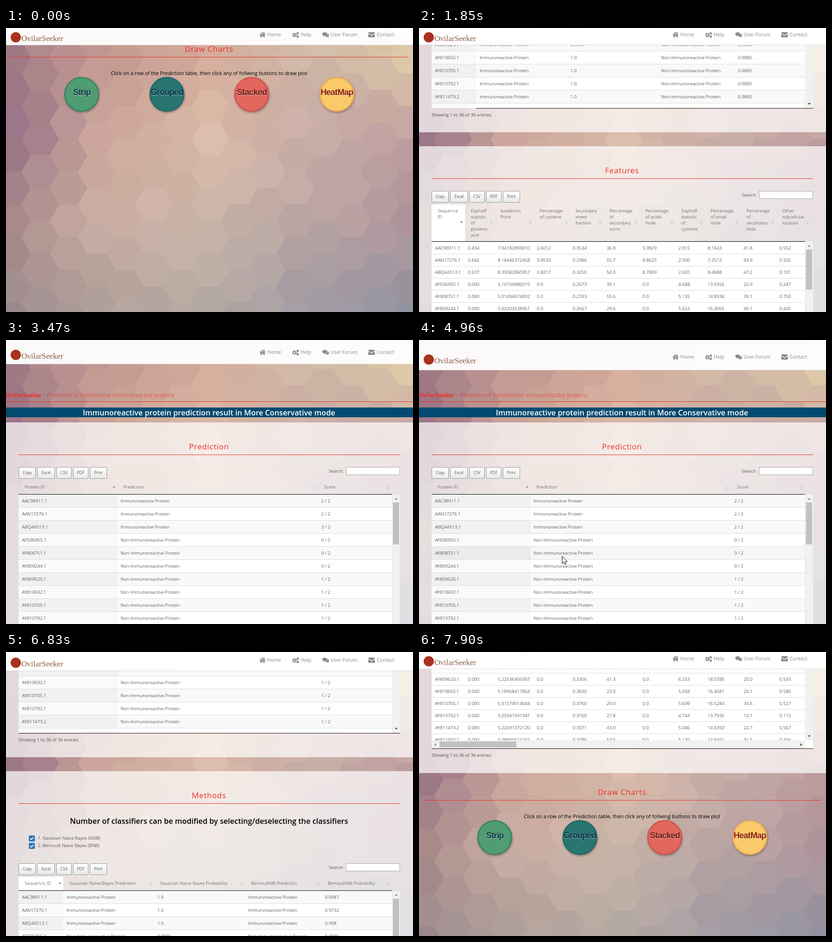
These frames come from a looping animation (874 px wide and 610 px high, 8000 ms). An HTML page:

```html
<!DOCTYPE html>
<html lang="en">
<head>
<meta charset="utf-8">
<title>Prediction result</title>
<style>
html, body { margin: 0; width: 100%; height: 100%; overflow: hidden; }
#stage { position: relative; width: 874px; height: 610px; overflow: hidden; background: #c4aaa2; font: 300 9.8px "Open Sans", sans-serif; color: #111; }
#stage div, #stage svg { position: absolute; box-sizing: border-box; }
#page { left: 0; top: 0; width: 874px; height: 2571px; will-change: transform; }
.t { line-height: 20px; white-space: pre; }
.mid { left: -1px; width: 874px; text-align: center; }
.sec { left: 0; width: 874px; background: rgba(255,255,255,.71); }
.h { font-size: 16.8px; font-weight: 500; letter-spacing: .7px; color: #ee3029; }
.big { font-size: 16.2px; font-weight: 600; color: #000; }
.tools { left: 27px; height: 25px; display: flex; gap: 3px; }
.tools span { border: 1px solid #999; border-radius: 2px; background: linear-gradient(#fff, #e9e9e9); padding: 0 8px; font-size: 8.6px; line-height: 22px; color: #000; }
.body { left: 27px; width: 819px; overflow: hidden; }
.row { left: 0; width: 802px; background: #fff; border-bottom: 1px solid #ddd; }
.plain { border: 0; border-top: 1px solid #ddd; }
.row .k { left: 0; top: 0; height: 100%; }
.odd { background: #f9f9f9; }
.odd .k { background: #f1f1f1; }
.even .k { background: #fafafa; }
.row.hover { background: #f6f6f6; }
.row.hover .k { background: #ebebeb; }
.row.sel { background: #acbad4; }
.row.sel .k { background: #a6b4cd; }
.row.sel.hover { background: #aab7d1; }
.disc { border-radius: 50%; border: 3px solid; box-shadow: 1px 2px 4px rgba(0,0,0,.35); }
.name { font: bold 18px/20px "Liberation Sans", Arial, sans-serif; letter-spacing: -.7px; text-shadow: 0 1px 1px rgba(255,255,255,.6); text-align: center; width: 120px; }
#bar { left: 0; top: 0; width: 874px; background: rgba(255,255,255,.95); border-bottom: 1px solid #ddd; }
#edge { left: 0; top: 7px; width: 874px; height: 1px; background: #f1f1f1; }
#nav { left: 0; top: 0; width: 874px; height: 40px; }
#nav .t { font-size: 10.5px; font-weight: 400; color: #888; }
#nav .brand { left: 33px; top: 13px; font: 400 17px/20px "Liberation Serif", serif; color: #8f5a48; }
</style>
</head>
<body>
<div id="stage">
  <svg id="hex" width="874" height="610"></svg>
  <div id="page"></div>
  <div id="bar"><div id="edge"></div><div id="nav"></div></div>
  <svg id="cursor" width="12" height="19"><path d="M.5 .5V16.5L4.2 13 6.5 18.3 9 17.2 6.8 12H11.5z" fill="#fff" stroke="#000"/></svg>
</div>
<script>
const $ = id => document.getElementById(id);
const page = $('page');
const RED = '#ee3029';

const lerp = (a, b, f) => a + (b - a) * f;
const clamp = (v, a, b) => Math.max(a, Math.min(b, v));
const smooth = f => (f = clamp(f, 0, 1), f * f * (3 - 2 * f));
const noise = (a, b) => {
  const n = Math.sin(a * 12.99 + b * 78.23) * 43758.5;
  return n - Math.floor(n);
};

// ---- helpers for markup
const box = (x, y, w, h, style = '', cls = '', inner = '') =>
  `<div class="${cls}" style="left:${x}px;top:${y}px;width:${w}px;height:${h}px;${style}">${inner}</div>`;
const rule = (x, y, w, color) => box(x, y, w, 1, 'background:' + color);
const text = (x, y, s, style = '') => `<div class="t" style="left:${x}px;top:${y - 10}px;${style}">${s}</div>`;
const centered = (y, s, cls, style = '') => `<div class="t mid ${cls}" style="top:${y - 10}px;${style}">${s}</div>`;
const icon = (x, y, w, h, inner) => `<svg style="left:${x}px;top:${y}px" width="${w}" height="${h}">${inner}</svg>`;
const tri = (x, y, dir, fill = '#505050') =>
  icon(x - 4, y - 4, 8, 8, `<path d="M1 6L4 2 7 6z" fill="${fill}" transform="rotate(${dir} 4 4)"/>`);
const sorter = (x, y, on) => on ? tri(x, y - 2, 0, '#8791d6')
  : icon(x - 3, y - 5, 6, 10, '<path d="M0 4L3 0 6 4zM0 6L3 10 6 6z" fill="#d3d0d3"/>');

// ---- hexagon backdrop: an even grid of tones, blended, one flat colour per cell
function backdrop() {
  const tones = [
    'a27c85 c59b93 d4a99a d0baa8 dfcca6',
    '967087 d0aa9d dcbba8 c8aca7 c2a1a1',
    'a98c8a cbaea3 c9b6a9 baa5a3 b1959d',
    '9b898e b2a39c b5aaa4 a09aa4 9193a0'
  ].map(r => r.split(' ').map(c => [0, 2, 4].map(i => parseInt(c.slice(i, i + 2), 16))));
  const mix = (a, b, f) => a.map((v, i) => lerp(v, b[i], f));
  const side = 40.6, high = 70.4;
  let out = '';
  for (let c = 0; c < 16; c++) for (let r = -1; r < 10; r++) {
    const x = 12.7 + 1.5 * side * c, y = 62.4 - (c % 2) * high / 2 + high * r;
    const u = clamp(x / 874 * 4, 0, 3.99), v = clamp((y - 40) / 190, 0, 2.99);
    const i = Math.floor(u), j = Math.floor(v);
    const [top, low] = [tones[j], tones[j + 1]].map(t => mix(t[i], t[i + 1], u - i));
    const shade = (noise(c, r) - .5) * 7;
    const rgb = mix(top, low, v - j).map(n => Math.round(n + shade));
    const pts = [0, 1, 2, 3, 4, 5].map(k => {
      const a = k * Math.PI / 3;
      return [x + (side + .4) * Math.cos(a), y + (side + .4) * Math.sin(a)].map(n => n.toFixed(1));
    });
    out += `<polygon points="${pts.join(' ')}" fill="rgb(${rgb})"/>`;
  }
  $('hex').innerHTML = out;
}

// ---- page parts
const section = (top, bottom, title) =>
  box(0, top, 874, bottom - top, '', 'sec') + centered(top + 52, title, 'h') + rule(27, top + 69, 819, RED);

const toolbar = y =>
  `<div class="tools" style="top:${y}px">${['Copy', 'Excel', 'CSV', 'PDF', 'Print'].map(s => `<span>${s}</span>`).join('')}</div>` +
  text(693, y + 8.5, 'Search:') + box(730, y, 116, 17, 'background:#fff;border:1px solid #aaa');

// line: y of the rule under the head; heads: [label, x]; each sorter sits just before the next column
function table({ id, line, heads, end = 841, headY = -15, iconY = -14, rows, rowH = 28, keyW, thumb = 90, low = 0 }) {
  const h = 319 - low;
  const head = heads.map(([s, x], i) =>
    s.split('|').map((p, n) => text(x, line + headY + n * 13, p, 'color:#333')).join('') +
    sorter((heads[i + 1] || [0, end])[1] - 20, line + iconY, !i)).join('');
  const cells = rows.map((r, i) =>
    box(0, i * rowH, 802, rowH, '', 'row ' + (keyW ? i % 2 ? 'even' : 'odd' : 'plain'),
      (keyW ? `<div class="k" style="width:${keyW}px"></div>` : '') +
      r.map((s, n) => text(heads[n][1] - 33 + (n ? 0 : .5), rowH / 2 - .5, s)).join(''))).join('');
  const foot = id === 'methods' ? keyW : 0;
  return head + `<div class="body" id="${id}" style="top:${line + 1}px;height:${h - 1}px">${cells}` +
    box(803, 0, 16, h, 'background:#f1f1f1') + box(804, 17, 13, thumb, 'background:#c1c1c1') +
    tri(810.5, 9, 0, '#8a8a8a') + tri(810.5, h - 10, 180) + '</div>' +
    rule(27, line, 802, '#111') + rule(27 + foot, line + 319, 819 - foot, '#111') +
    text(27, line + 334, 'Showing 1 to 36 of 36 entries', 'color:#000');
}

const ids = ['AAC98911.1', 'AAN17276.1', 'ABQ44513.1', 'AF036955.1', 'AY808751.1', 'AY809244.1',
  'AY809620.1', 'AY810692.1', 'AY810705.1', 'AY810792.1', 'AY811479.2', 'AY811902.1'];
const yes = 'Immunoreactive Protein', no = 'Non-' + yes;

// Only the first three proteins hold cysteine and acidic residues; some columns follow from others.
function features(id, i) {
  const first = i < 3;
  const rand = (col, lo, hi) => lerp(lo, hi, noise(i + 1, col));
  const small = first ? rand(1, 6.2, 10.5) : rand(1, 13.4, 21.3);
  const cys = first ? rand(2, 2.6, 4.2) : 0;
  return [id, (cys / 6).toFixed(3), (first ? rand(3, 7.9, 8.5) : rand(3, 4.96, 5.27)).toFixed(11),
    cys.toFixed(first ? 4 : 1), rand(4, .25, .39).toFixed(4), rand(5, 23, 57).toFixed(1),
    (cys * 2.3).toFixed(first ? 4 : 1), (small * .3448).toFixed(3), small.toFixed(4),
    rand(6, 10, 52).toFixed(1), rand(7, .1, .9).toFixed(3)];
}

const check = (y, s) => box(49, y - 6, 13, 13, 'background:#2a78b5;border-radius:2px') +
  icon(49, y - 6, 13, 13, '<path d="M3 6.5L5.5 9 10 4" fill="none" stroke="#fff" stroke-width="1.8"/>') + text(68, y, s);

const disc = ([s, fill, edge, ink], i) => {
  const x = 125 + 182.5 * i;
  return box(x, 2066, 75, 75, `background:${fill};border-color:${edge}`, 'disc') +
    `<div class="name" style="left:${x - 22}px;top:2089px;color:${ink}">${s}</div>`;
};

function buildPage() {
  const red = 'font-size:11.9px;color:' + RED;
  page.innerHTML =
    `<div class="t" style="right:798px;top:108px;font-weight:700;${red}">OvilarSeeker</div>` +
    text(79, 118, ':', red) + text(88, 118, 'Prediction of schistosome immunoreactive proteins', red) +
    rule(0, 132, 874, RED) + box(0, 145, 874, 21, 'background:#034a70') +
    centered(155.5, 'Immunoreactive protein prediction result in More Conservative mode', 'big', 'color:#fff') +

    section(177, 702, 'Prediction') + toolbar(273) +
    table({
      id: 'prediction', line: 331, keyW: 213,
      heads: [['Protein ID', 40], ['Prediction', 252], ['Score', 683]],
      rows: ids.map((id, i) => [id, i < 3 ? yes : no, (i < 3 ? 2 : i < 6 ? 0 : 1) + ' / 2'])
    }) +

    section(732, 1359, 'Methods') +
    centered(839, 'Number of classifiers can be modified by selecting/deselecting the classifiers', 'big') +
    check(876, '1. Gaussian Naive Bayes (GNB)') + check(892, '2. Bernoulli Naive Bayes (BNB)') + toolbar(930) +
    box(27, 959, 96, 29, 'background:#fff') +
    table({
      id: 'methods', line: 988, keyW: 96,
      heads: [['Sequence_ID', 40], ['Gaussian Naive Bayes Prediction', 136], ['Gaussian Naive Bayes Probability', 331],
        ['BernoulliNB Prediction', 526], ['BernoulliNB Probability', 691]],
      rows: ids.map((id, i) => [id, i > 2 && i < 6 ? no : yes, { 3: '0.9996', 5: '0.9828', 6: '0.9595' }[i] || '1.0',
        i < 3 ? yes : no, ['0.9987', '0.9732', '0.998'][i] || '0.9885'])
    }) +

    section(1389, 1965, 'Features') + toolbar(1485) + box(27, 1514, 72, 79, 'background:#fff') +
    table({
      id: 'features', line: 1593, headY: -65, iconY: -40, rowH: 26, thumb: 86, low: 17, end: 855,
      heads: [['Sequence|ID', 40], ['Dayhoff|statistic|of|glutamic|acid', 111], ['Isoelectric|Point', 175],
        ['Percentage|of cysteine', 259], ['Secondary|sheet|fraction', 336], ['Percentage|of|secondary|turns', 409],
        ['Percentage|of acidic|mole', 486], ['Dayhoff|statistic|of|cysteine', 563], ['Percentage|of small|mole', 626],
        ['Percentage|of|secondary|helix', 703], ['Other|subcellular|location', 780]],
      rows: ids.map(features)
    }) +
    box(27, 1895, 802, 17, 'background:#f1f1f1') + box(829, 1895, 17, 17, 'background:#fff') +
    box(44, 1897, 165, 13, 'background:#c1c1c1') + tri(35, 1903.5, -90, '#8a8a8a') + tri(821, 1903.5, 90) +

    centered(2006, 'Draw Charts', 'h') + rule(9, 2023, 855, RED) +
    centered(2058, 'Click on a row of the Prediction table, then click any of follwing buttons to draw plot', '', 'font-size:10.9px;font-weight:400;color:#000') +
    [['Strip', '#519d73', '#3c8566', '#12394a'], ['Grouped', '#297570', '#1f6a6e', '#0d3549'],
      ['Stacked', '#e2675f', '#d2554e', '#6b1f1a'], ['HeatMap', '#fac96a', '#eeae57', '#8a2113']].map(disc).join('');
}

function buildNav() {
  const gear = (x, y, r) => `<circle cx="${x}" cy="${y}" r="${r}" fill="none" stroke="#888" stroke-width="2"/>` +
    `<circle cx="${x}" cy="${y}" r="${r + 1.4}" fill="none" stroke="#888" stroke-width="1.2" stroke-dasharray="1.6 1.5"/>`;
  const shape = d => `<path d="${d}" fill="#888"/>`;
  const bubble = (x, y, rx, ry) => `<ellipse cx="${x}" cy="${y}" rx="${rx}" ry="${ry}" fill="#888" stroke="#fff" stroke-width=".8"/>`;
  $('nav').innerHTML =
    box(10, 9, 22, 22, 'border-radius:50%;background:#a8321e') + '<div class="brand">OvilarSeeker</div>' +
    icon(544, 8, 14, 12, shape('M0 6.5L7 .5 14 6.5 13 7.4 7 2.5 1 7.4zM2.2 7.6L7 3.7 11.8 7.6V12H8.3V8.5H5.7V12H2.2zM9.5 1H11.3V4H9.5z')) +
    icon(614, 8, 16, 14, gear(5.3, 7, 2.8) + gear(12.4, 3.6, 1.1) + gear(12.4, 10.6, 1.1)) +
    icon(679, 9, 15, 12, bubble(10, 6.5, 5, 4) + shape('M11 9L14 11.6 13 8zM3 6L2 9.6 6 7z') + bubble(5.5, 4, 5.7, 4.2)) +
    icon(778, 9, 14, 11, shape('M0 0H14V1.6L7 6.4 0 1.6zM0 3.2L7 8 14 3.2V11H0z')) +
    [['Home', 561], ['Help', 633], ['User Forum', 697], ['Contact', 796]].map(([s, x]) => text(x, 14, s)).join('');
}

// ---- motion, held for one step at a time
const LOOP = 8000, STEP = 76.9;
const UP = [[0, 1953], [12, 1135], [20, 611], [28, 95], [31, 0]];
const DOWN = [[0, 6], [12, 946], [20, 1705]];
const POINTER = [[4100, 773, 528], [4560, 309, 472], [4860, 303, 472], [5110, 314, 448], [5600, 314, 448], [5800, 837, 445]];
const CLICK = 5260, LEAVE = 6040;

function along(keys, at, col = 1) {
  let i = 1;
  while (i < keys.length - 1 && at > keys[i][0]) i++;
  const a = keys[i - 1], b = keys[i];
  return lerp(a[col], b[col], clamp((at - a[0]) / (b[0] - a[0]), 0, 1));
}
const stepOf = (t, base) => Math.floor((t - base + 10) / STEP);

// scroll offset and how far the top bar is open
function pose(t) {
  const back = t >= 6350, base = back ? 6360 : 930;
  const k = stepOf(t, base), at = base + k * STEP;
  if (k < 0) return [1961, 0];
  return back ? [along(DOWN, k), 1 - smooth((at - 6370) / 600)] : [along(UP, k), smooth((at - 3140) / 630)];
}

function draw(now) {
  const t = now % LOOP;
  const [scroll, open] = pose(t);
  page.style.transform = `translateY(${-Math.round(scroll)}px)`;
  $('bar').style.height = Math.round(37 + 28 * open) + 'px';
  $('nav').style.transform = `translateY(${Math.round(22 * open)}px)`;
  $('edge').style.opacity = open;

  const shown = t >= POINTER[0][0] && t < LEAVE;
  const at = POINTER[0][0] + stepOf(t, POINTER[0][0]) * STEP;
  const x = Math.round(along(POINTER, at, 1)), y = Math.round(along(POINTER, at, 2));
  $('cursor').style.cssText = `display:${shown ? 'block' : 'none'};left:${x}px;top:${y}px`;
  const over = shown && x < 829 ? Math.floor((y - 332) / 28) : -1;
  rows.forEach((r, i) => {
    r.classList.toggle('hover', i === over);
    r.classList.toggle('sel', i === 4 && t >= CLICK);
  });
}

backdrop();
buildPage();
buildNav();
const rows = [...document.querySelectorAll('#prediction .row')];
const start = performance.now();
function tick() {
  draw(performance.now() - start);
  requestAnimationFrame(tick);
}
tick();
</script>
</body>
</html>
```
